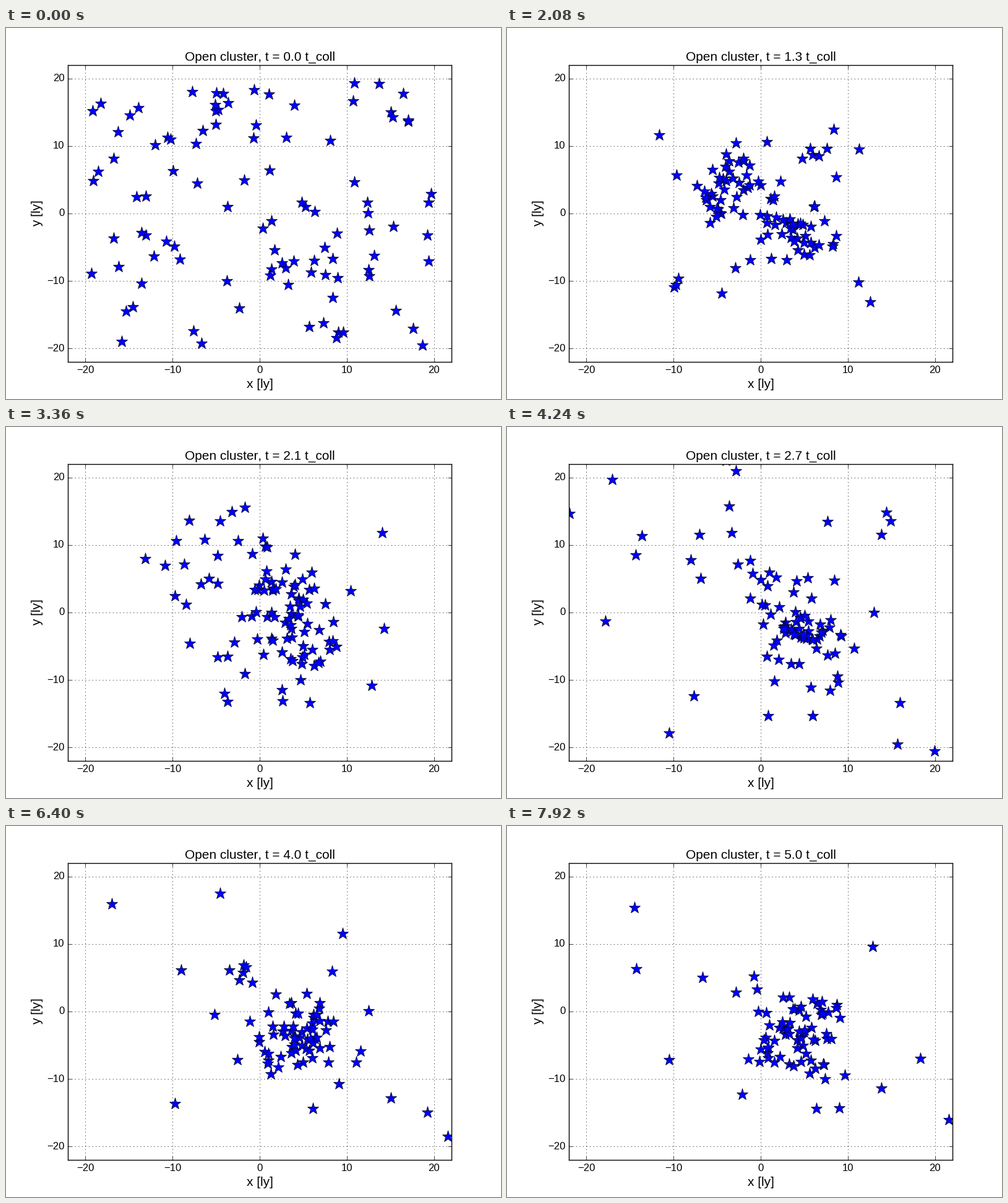
Write a matplotlib script that moves like this. It is 800 px wide and 600 px high and loops after 8 s.

```python
import numpy as np
import matplotlib.pyplot as plt
from matplotlib.animation import FuncAnimation

W, H, DPI = 800, 600, 100
FRAMES, INTERVAL = 100, 80
T_END = 5.0
STARS, HALF_SIDE = 100, 20.0
SOFTENING = 1.0
SUBSTEPS = 20
CORE = np.array([2.3, -0.8])

# Number of stars in each 10 x 10 ly cell, top row first
DENSITY = [[8, 13, 4, 8],
           [5, 4, 4, 5],
           [7, 3, 15, 7],
           [4, 3, 7, 3]]

# Unit of time: free fall of a uniform sphere of radius HALF_SIDE
GRAVITY = np.pi ** 2 * HALF_SIDE ** 3 / (8 * STARS)


def initial_positions(rng):
    """Uniform stars in every cell, spread evenly over the depth."""
    stars = []
    for row, counts in enumerate(DENSITY):
        for col, count in enumerate(counts):
            x = rng.uniform(0, 10, count) + 10 * col - HALF_SIDE
            y = HALF_SIDE - 10 * row - rng.uniform(0, 10, count)
            z = rng.uniform(-HALF_SIDE, HALF_SIDE, count)
            stars.append(np.column_stack([x, y, z]))
    return np.concatenate(stars)


def acceleration(pos):
    sep = pos[None, :, :] - pos[:, None, :]
    dist2 = (sep ** 2).sum(axis=2) + SOFTENING ** 2
    return GRAVITY * np.einsum("ijk,ij->ik", sep, dist2 ** -1.5)


def simulate():
    """Cold collapse from rest, integrated with leapfrog, seen along z."""
    pos = initial_positions(np.random.default_rng(4))
    vel = np.zeros_like(pos)
    acc = acceleration(pos)
    dt = T_END / (FRAMES - 1) / SUBSTEPS
    path = [pos[:, :2].copy()]
    for _ in range(FRAMES - 1):
        for _ in range(SUBSTEPS):
            vel += 0.5 * dt * acc
            pos += dt * vel
            acc = acceleration(pos)
            vel += 0.5 * dt * acc
        path.append(pos[:, :2].copy())
    return np.array(path)


def smoothstep(t, start, end):
    u = np.clip((t - start) / (end - start), 0, 1)
    return u * u * (3 - 2 * u)


times = np.linspace(0, T_END, FRAMES)

# After the collapse the cluster settles slightly off centre
drift = smoothstep(times, 1.2, 2.8)
paths = simulate() + drift[:, None, None] * CORE

plt.rcParams.update({
    "font.family": "Liberation Sans",
    "font.size": 12,
    "text.kerning_factor": 6,
    "lines.scale_dashes": False,
    "axes.linewidth": 1.0,
    "ytick.alignment": "center",
})

fig = plt.figure(figsize=(W / DPI, H / DPI), dpi=DPI, facecolor="white")
ax = fig.add_axes([0.125, 0.1, 0.775, 0.8])
ax.set_xlim(-22, 22)
ax.set_ylim(-22, 22)
ticks = range(-20, 21, 10)
ax.set_xticks(ticks)
ax.set_yticks(ticks)
ax.tick_params(direction="in", length=4, width=0.5, pad=4,
               top=True, right=True, labelsize=12)
ax.set_axisbelow(False)
ax.grid(True, color="black", linewidth=0.5, linestyle=(0, (1, 3)))


def label(x, y, text, rotation=0):
    fig.text(x / W, 1 - y / H, text, fontsize=15, rotation=rotation,
             ha="center", va="baseline", rotation_mode="anchor")


label(410, 582, "x [ly]")
label(56, 300, "y [ly]", rotation=90)
title = ax.set_title("", fontsize=15, pad=5)
stars, = ax.plot([], [], "*", color="blue", markersize=14,
                 markeredgecolor="black", markeredgewidth=0.5)


def draw(i):
    stars.set_data(paths[i, :, 0], paths[i, :, 1])
    title.set_text(f"Open cluster, t = {times[i]:.1f} t_coll")
    return stars, title


anim = FuncAnimation(fig, draw, frames=FRAMES, interval=INTERVAL,
                     repeat=True, repeat_delay=0, blit=False)
plt.show()
```
